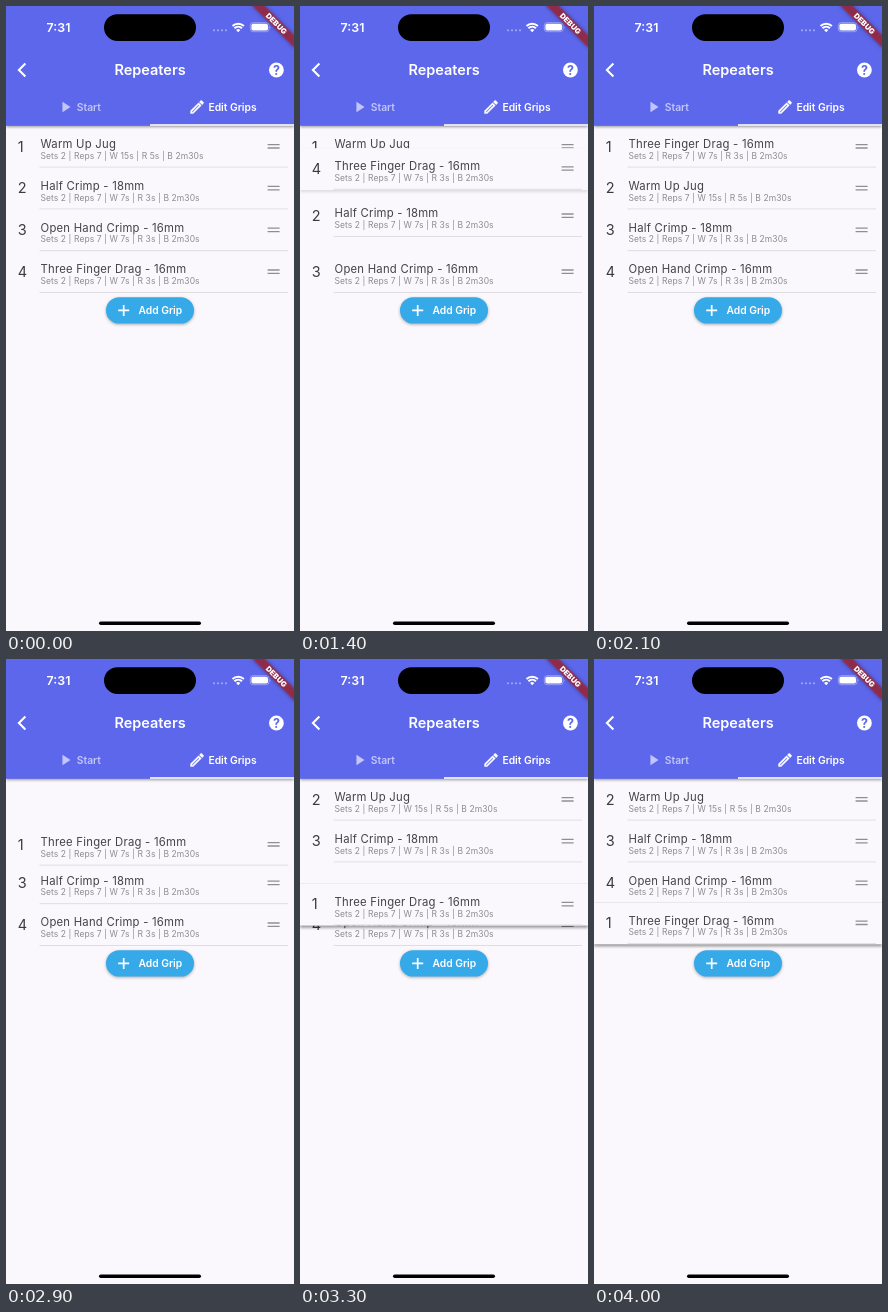
These frames come from a looping animation (288x625 px, 4.1 s). An HTML page:

```html
<!DOCTYPE html>
<html lang="en">
<head>
<meta charset="utf-8">
<title>Repeaters</title>
<style>
  html, body { margin: 0; width: 100%; height: 100%; overflow: hidden; background: #faf8fc; }
  svg { display: block; width: 288px; height: 625px; font-family: Inter, sans-serif; }
  .bar { fill: #5c67ec; filter: drop-shadow(0 1.5px 1.5px rgba(0, 0, 0, .42)); }
  .time { font-size: 12.4px; font-weight: 600; }
  .head { font-size: 14.5px; font-weight: 600; }
  .label { font-size: 10.3px; font-weight: 600; }
  .debug { font-size: 7.5px; font-weight: 900; }
  .help { font-size: 12.5px; font-weight: 700; fill: #5c67ec; }
  .num { font-size: 14.5px; fill: #3b3a3f; }
  .name { font-size: 11.3px; letter-spacing: .24px; fill: #434247; }
  .info { font-size: 8.5px; letter-spacing: .09px; fill: #8c8b91; }
  .rule { stroke: #d9d7dc; stroke-width: .8; }
  .grip { stroke: #8f8e94; stroke-width: 1.3; }
  .add { fill: #36a9e9; filter: drop-shadow(0 1.5px 1.5px rgba(0, 0, 0, .32)); }
  .ribbon { fill: #b71c1c; fill-opacity: .66; filter: drop-shadow(0 0 2px rgba(0, 0, 0, .5)); }
</style>
</head>
<body>
<svg viewBox="0 0 288 625">
  <rect width="288" height="625" fill="#faf8fc"/>
  <g id="list"></g>

  <rect class="add" x="100" y="291.2" width="88" height="26.4" rx="13.2"/>
  <path d="M112.2 304.4h11M117.7 298.9v11" stroke="#fff" stroke-width="1.7"/>
  <text class="label" x="132.4" y="308" fill="#fff">Add Grip</text>

  <rect class="bar" y="-10" width="288" height="129.8"/>
  <rect x="144" y="118.2" width="144" height="1.6" fill="#fff"/>
  <rect x="98" y="8.2" width="92" height="26.8" rx="13.4"/>
  <g fill="#fff">
    <text class="time" x="52.5" y="26" text-anchor="middle">7:31</text>
    <g opacity=".4">
      <circle cx="208" cy="24.3" r="1.1"/><circle cx="212" cy="24.3" r="1.1"/>
      <circle cx="216" cy="24.3" r="1.1"/><circle cx="220" cy="24.3" r="1.1"/>
    </g>
    <path d="M230.1 24.1a3 3 0 0 1 4.2 0L232.2 26.3z"/>
    <path d="M228.4 22.3a5.5 5.5 0 0 1 7.6 0M226.5 20a8.2 8.2 0 0 1 11.4 0" fill="none" stroke="#fff" stroke-width="1.9"/>
    <rect x="244.3" y="16.7" width="18.8" height="9" rx="2.8" fill="none" stroke="#fff" stroke-width=".8" opacity=".45"/>
    <rect x="245.4" y="17.8" width="16.6" height="6.8" rx="1.8"/>
    <path d="M263.9 19.9q1.4 1.4 0 2.8z" opacity=".5"/>

    <path d="M19.4 57.5L12.9 64l6.5 6.5" fill="none" stroke="#fff" stroke-width="2.1"/>
    <text class="head" x="144" y="69.2" text-anchor="middle">Repeaters</text>
    <circle cx="270.4" cy="64" r="7.4"/>
    <text class="help" x="270.4" y="68.5" text-anchor="middle">?</text>

    <g opacity=".62">
      <path transform="translate(50.6 92.2) scale(.733)" d="M8 5v14l11-7z"/>
      <text class="label" x="70.8" y="104.8">Start</text>
    </g>
    <path transform="translate(182.3 92.2) scale(.733)" stroke="#fff" stroke-width=".5" d="M14.06 9.02l.92.92L5.92 19H5v-.92l9.06-9.06M17.66 3c-.25 0-.51.1-.7.29l-1.83 1.83 3.75 3.75 1.83-1.83c.39-.39.39-1.02 0-1.41l-2.34-2.34c-.2-.2-.45-.29-.71-.29zm-3.6 3.19L3 17.25V21h3.75L17.81 9.94l-3.75-3.75z"/>
    <text class="label" x="202.4" y="104.8">Edit Grips</text>
  </g>

  <g transform="translate(288 0) rotate(45)">
    <rect class="ribbon" x="-30" y="20.5" width="60" height="8.8"/>
    <text class="debug" y="27.6" text-anchor="middle" fill="#fff">DEBUG</text>
  </g>
  <rect x="93" y="615.5" width="102" height="3.4" rx="1.7"/>
  <g id="top"></g>
</svg>
<script>
const LOOP = 4100, STEP = 100, PITCH = 41.8, RENUMBER = 2100;
const $ = id => document.getElementById(id);

function addRow(parent, name, work, rest) {
  parent.insertAdjacentHTML('beforeend', `<g>
    <rect class="back" y="120" width="288" height="${PITCH}" fill="#faf8fc" visibility="hidden"/>
    <text class="num" x="11.8" y="145.5"></text>
    <text class="name" x="34.5" y="142">${name}</text>
    <text class="info" x="34.4" y="152.9">Sets 2 | Reps 7 | W ${work}s | R ${rest}s | B 2m30s</text>
    <path class="grip" d="M261.6 138.6h12M261.6 142h12"/>
    <path class="rule" d="M33.5 161.1H282"/>
  </g>`);
  const g = parent.lastElementChild;
  return { g, num: g.querySelector('.num'), back: g.querySelector('.back') };
}

// leave/home: when each row makes room and when it returns
const rows = [
  { ...addRow($('list'), 'Warm Up Jug', 15, 5), leave: 1400, home: 2900 },
  { ...addRow($('list'), 'Half Crimp - 18mm', 7, 3), leave: 1253, home: 3000 },
  { ...addRow($('list'), 'Open Hand Crimp - 16mm', 7, 3), leave: 1150, home: 3300 }
];
const held = addRow($('top'), 'Three Finger Drag - 16mm', 7, 3);

const dragPath = [
  [1100, 125.4], [1150, 104.5], [1250, 62.7], [1400, 22.2], [1500, 6], [1600, 0],
  [2800, 0], [2900, 45], [3000, 66], [3100, 80], [3200, 93], [3300, 104.8],
  [3400, 112], [3600, 119], [4000, 123.5]
];
const liftPath = [
  [1200, 0], [1400, .3], [1600, 1], [1750, 1], [2050, 0], [2900, 0], [3150, 1]
];

function along(path, t) {
  const i = path.findIndex(p => p[0] > t);
  if (i === 0) return path[0][1];
  if (i < 0) return path[path.length - 1][1];
  const [t0, a] = path[i - 1], [t1, b] = path[i];
  return a + (b - a) * (t - t0) / (t1 - t0);
}

function ease(t, start) {
  const k = Math.min(1, Math.max(0, (t - start) / 250));
  return k < .5 ? 2 * k * k : 1 - 2 * (1 - k) ** 2;
}

const moveTo = (row, y) => row.g.setAttribute('transform', `translate(0 ${y.toFixed(2)})`);

function draw(t) {
  const moved = t >= RENUMBER;
  rows.forEach((row, i) => {
    moveTo(row, PITCH * (i + ease(t, row.leave) - ease(t, row.home)));
    row.num.textContent = i + (moved ? 2 : 1);
  });
  held.num.textContent = moved ? 1 : 4;
  moveTo(held, along(dragPath, t));

  const dragging = (t >= 1200 && t < RENUMBER) || t >= 2900;
  const lift = along(liftPath, t);
  held.back.setAttribute('visibility', dragging ? 'visible' : 'hidden');
  held.back.style.filter = lift > 0
    ? `drop-shadow(0 2px 1.8px rgba(0,0,0,${.36 * lift})) drop-shadow(0 0 .7px rgba(0,0,0,${.2 * lift}))`
    : 'none';
}

const begin = performance.now();
function tick() {
  const t = (performance.now() - begin) % LOOP;
  draw(Math.floor(t / STEP) * STEP);
  requestAnimationFrame(tick);
}
tick();
</script>
</body>
</html>
```
